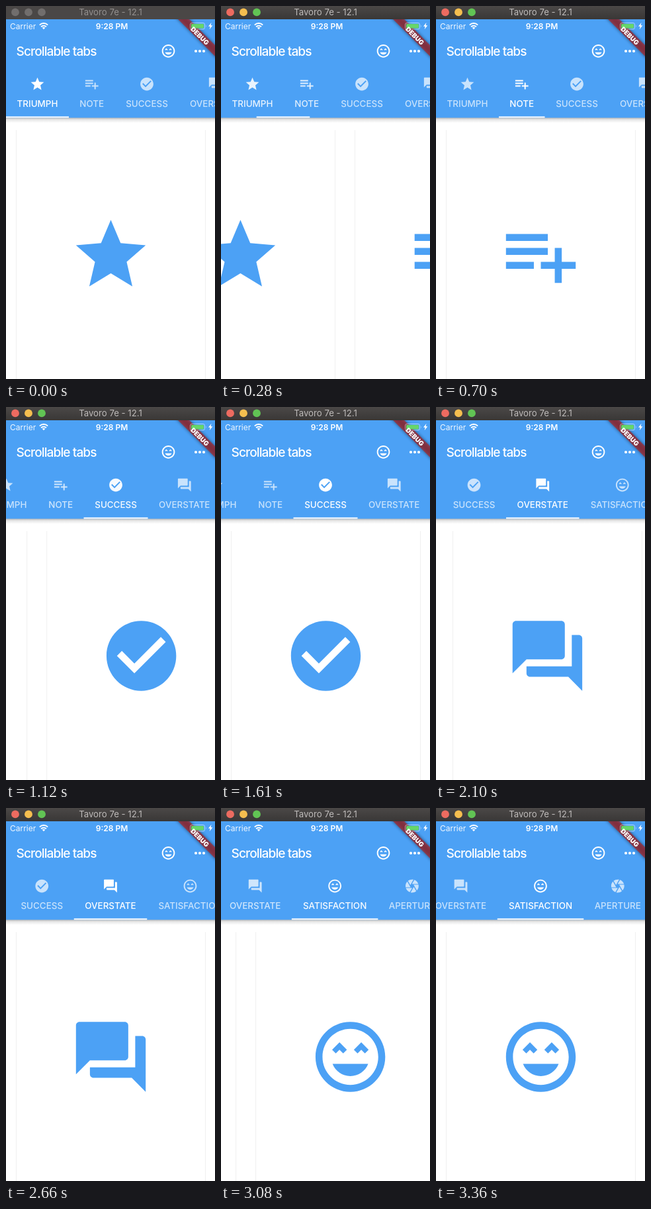
These frames come from a looping animation (316 px wide and 562 px high, 3.78 s). An HTML page:

```html
<!DOCTYPE html>
<html lang="en">
<head>
<meta charset="utf-8">
<title>Scrollable tabs</title>
<style>
html, body { margin: 0; width: 100%; height: 100%; overflow: hidden; background: #fff; }
svg { display: block; width: 316px; height: 562px; font-family: Inter, Roboto, sans-serif; fill: #fff; }
.mid { text-anchor: middle; }
.label { font-size: 13.4px; font-weight: 500; }
.title { font-size: 19.1px; font-weight: 500; letter-spacing: -.92px; }
.status { font-size: 12px; }
</style>
</head>
<body>
<svg viewBox="0 0 316 562">
  <defs>
    <linearGradient id="chrome" x2="0" y2="1">
      <stop stop-color="#4b4847"/><stop offset="1" stop-color="#393736"/>
    </linearGradient>
    <linearGradient id="shade" x2="0" y2="1">
      <stop stop-color="#000" stop-opacity=".3"/>
      <stop offset=".4" stop-color="#000" stop-opacity=".1"/>
      <stop offset="1" stop-color="#000" stop-opacity="0"/>
    </linearGradient>
    <filter id="blur" x="-20%" y="-100%" width="140%" height="300%"><feGaussianBlur stdDeviation="2.5"/></filter>
    <clipPath id="app"><path d="M0 20H316V562H0z"/></clipPath>
  </defs>
  <rect width="316" height="562"/>
  <g id="pages" fill="#4ca1f5"></g>

  <rect y="168" width="316" height="8" fill="url(#shade)"/>
  <rect y="19" width="316" height="149.4" fill="#4ca1f5"/>
  <text class="title" x="15.6" y="74.9">Scrollable tabs</text>
  <path id="mood" transform="translate(233.7 56) scale(.985)"/>
  <g><circle cx="287" cy="68" r="2.1"/><circle cx="293" cy="68" r="2.1"/><circle cx="299" cy="68" r="2.1"/></g>
  <g id="tabs"></g>

  <text class="status" x="6" y="34.5" opacity=".92">Carrier</text>
  <g fill="none" stroke="#fff" stroke-width="2">
    <path d="M50.8 28.6a9 9 0 0 1 12.4 0M53.1 31.2a5.7 5.7 0 0 1 7.8 0"/>
  </g>
  <path d="M57 35.2l-2.2-2.4a3.2 3.2 0 0 1 4.4 0z"/>
  <text class="status mid" x="160" y="34.5" font-weight="600">9:28 PM</text>

  <g clip-path="url(#app)">
    <g transform="translate(316 20) rotate(45)">
      <rect x="-45" y="27.5" width="90" height="12" fill="#000" opacity=".5" filter="url(#blur)"/>
      <rect x="-45" y="27.5" width="90" height="12" fill="#b71c1c" opacity=".63"/>
    </g>
    <rect x="278.5" y="25.5" width="22" height="9.5" rx="2.5" fill="none" stroke="#fff" stroke-opacity=".5"/>
    <rect x="280" y="27" width="19" height="6.5" rx="1.3" fill="#67d66a"/>
    <path d="M302 28.6q1.8 1.6 0 3.4z" opacity=".5"/>
    <path d="M310.5 25l-4.5 5.8h2.7l-1 4.4 4.6-6h-2.8z"/>
    <text class="mid" transform="translate(316 20) rotate(45)" x="1.5" y="37.4" font-size="9.8" font-weight="900">DEBUG</text>
  </g>

  <rect id="bar" width="316" height="20"/>
  <g id="lights"><circle cx="14" cy="9.4" r="5.9"/><circle cx="34" cy="9.4" r="5.9"/><circle cx="54" cy="9.4" r="5.9"/></g>
  <text id="device" class="mid" x="158" y="14" font-size="13.2">Tavoro 7e - 12.1</text>
</svg>
<script>
const $ = id => document.getElementById(id);
const LOOP = 3780, STEP = 70, SLIDE = 520, WIDTH = 316;
const STARTS = [150, 830, 1697, 2770];   // taps on the next tab
const ICON = 'translate(-11.85 -11.85) scale(.9875)';

const MOOD = 'M11.99 2C6.47 2 2 6.47 2 12s4.47 10 9.99 10S22 17.53 22 12 17.52 2 11.99 2zm.01 18c-4.42 0-8-3.58-8-8s3.58-8 8-8 8 3.58 8 8-3.58 8-8 8zm1-10.06L14.06 11l1.06-1.06L16.18 11l1.06-1.06-2.12-2.12zm-4.12 0L9.94 11 11 9.94 8.88 7.82 6.76 9.94 7.82 11zM12 17.5c2.33 0 4.31-1.46 5.11-3.5H6.89c.8 2.04 2.78 3.5 5.11 3.5z';
const TABS = [
  ['TRIUMPH', 95, 'M12 17.27L18.18 21l-1.64-7.03L22 9.24l-7.19-.61L12 2 9.19 8.63 2 9.24l5.46 4.73L5.82 21z'],
  ['NOTE', 69.5, 'M14 10H2v2h12zM14 6H2v2h12zM18 14v-4h-2v4h-4v2h4v4h2v-4h4v-2zM2 16h8v-2H2z'],
  ['SUCCESS', 97, 'M12 2C6.48 2 2 6.48 2 12s4.48 10 10 10 10-4.48 10-10S17.52 2 12 2zm-2 15l-5-5 1.41-1.41L10 14.17l7.59-7.59L19 8z'],
  ['OVERSTATE', 110.5, 'M21 6h-2v9H6v2c0 .55.45 1 1 1h11l4 4V7c0-.55-.45-1-1-1zm-4 6V3c0-.55-.45-1-1-1H3c-.55 0-1 .45-1 1v14l4-4h10c.55 0 1-.45 1-1z'],
  ['SATISFACTION', 130.5, MOOD],
  ['APERTURE', 103, 'M9.4 10.5l4.77-8.26C13.47 2.09 12.75 2 12 2c-2.4 0-4.6.85-6.32 2.25l3.66 6.35.06-.1zM21.54 9c-.92-2.92-3.15-5.26-6-6.34L11.88 9h9.66zm.26 1h-7.49l.29.5 4.76 8.25C20.99 16.97 22 14.61 22 12c0-.69-.07-1.35-.2-2zM8.54 12l-3.9-6.75C3.01 7.03 2 9.39 2 12c0 .69.07 1.35.2 2h7.49l-1.15-2zm-6.08 3c.92 2.92 3.15 5.26 6 6.34L12.12 15H2.46zm11.27 0l-3.9 6.76c.7.15 1.42.24 2.17.24 2.4 0 4.6-.85 6.32-2.25l-3.66-6.35-.93 1.6z']
];

let left = 0;
const tabs = TABS.map(([name, width, icon]) => {
  const tab = { name, width, icon, left, mid: left + width / 2 };
  tab.scroll = Math.max(0, tab.mid - WIDTH / 2);
  left += width;
  return tab;
});

$('mood').setAttribute('d', MOOD);
$('tabs').innerHTML = tabs.map(t => `<g class="tab">
  <path transform="translate(${t.mid} 117.5) ${ICON}" d="${t.icon}"/>
  <text class="label mid" x="${t.mid}" y="152.3">${t.name}</text></g>`).join('') +
  '<rect id="mark" y="166.4" height="2"/>';
$('pages').innerHTML = tabs.map((t, i) => `<g transform="translate(${i * WIDTH})">
  <path d="M15.5 187V562M301.5 187V562" stroke="#f0f0f0"/>
  <path transform="translate(158.5 375) scale(5.27) translate(-12 -12)" d="${t.icon}"/></g>`).join('');
const tabNodes = document.querySelectorAll('.tab');

const clamp = x => Math.min(1, Math.max(0, x));
const mix = (a, b, k) => a + (b - a) * k;

// cubic-bezier(.25, .1, .25, 1)
function ease(x) {
  let lo = 0, hi = 1;
  for (let i = 0; i < 24; i++) {
    const u = (lo + hi) / 2;
    if (.75 * u * (1 - u) + u ** 3 < x) lo = u; else hi = u;
  }
  return .3 * lo * (1 - lo) ** 2 + 3 * lo * lo * (1 - lo) + lo ** 3;
}

// The underline closes in on its tab a little more at every tick.
function chase(x) {
  let rest = 1;
  for (let k = 1; k <= x * 18; k++) rest *= 1 - ease(k / 18);
  return 1 - rest;
}

function draw(time) {
  const from = Math.max(0, STARTS.filter(s => s <= time).length - 1);
  const x = clamp((time - STARTS[from]) / SLIDE);
  const k = x < 1 ? ease(x) : 1, m = chase(x);
  const a = tabs[from], b = tabs[from + 1];

  $('pages').setAttribute('transform', `translate(${-(from + k) * WIDTH})`);
  $('tabs').setAttribute('transform', `translate(${-mix(a.scroll, b.scroll, k)})`);
  $('mark').setAttribute('x', mix(a.left, b.left, m));
  $('mark').setAttribute('width', mix(a.width, b.width, m));
  tabNodes.forEach((node, i) => {
    const active = i === from ? 1 - k : i === from + 1 ? k : 0;
    node.setAttribute('opacity', mix(.7, 1, active));
  });

  const focused = time >= STEP;
  $('bar').setAttribute('fill', focused ? 'url(#chrome)' : '#4a4746');
  $('device').setAttribute('fill', focused ? '#bebbba' : '#93908f');
  ['#ed6b60', '#f5be4f', '#61c454'].forEach((color, i) =>
    $('lights').children[i].setAttribute('fill', focused ? color : '#716e6d'));
}

const begin = performance.now();
function tick() {
  const time = (performance.now() - begin) % LOOP;
  draw(Math.floor(time / STEP) * STEP);
  requestAnimationFrame(tick);
}
tick();
</script>
</body>
</html>
```
